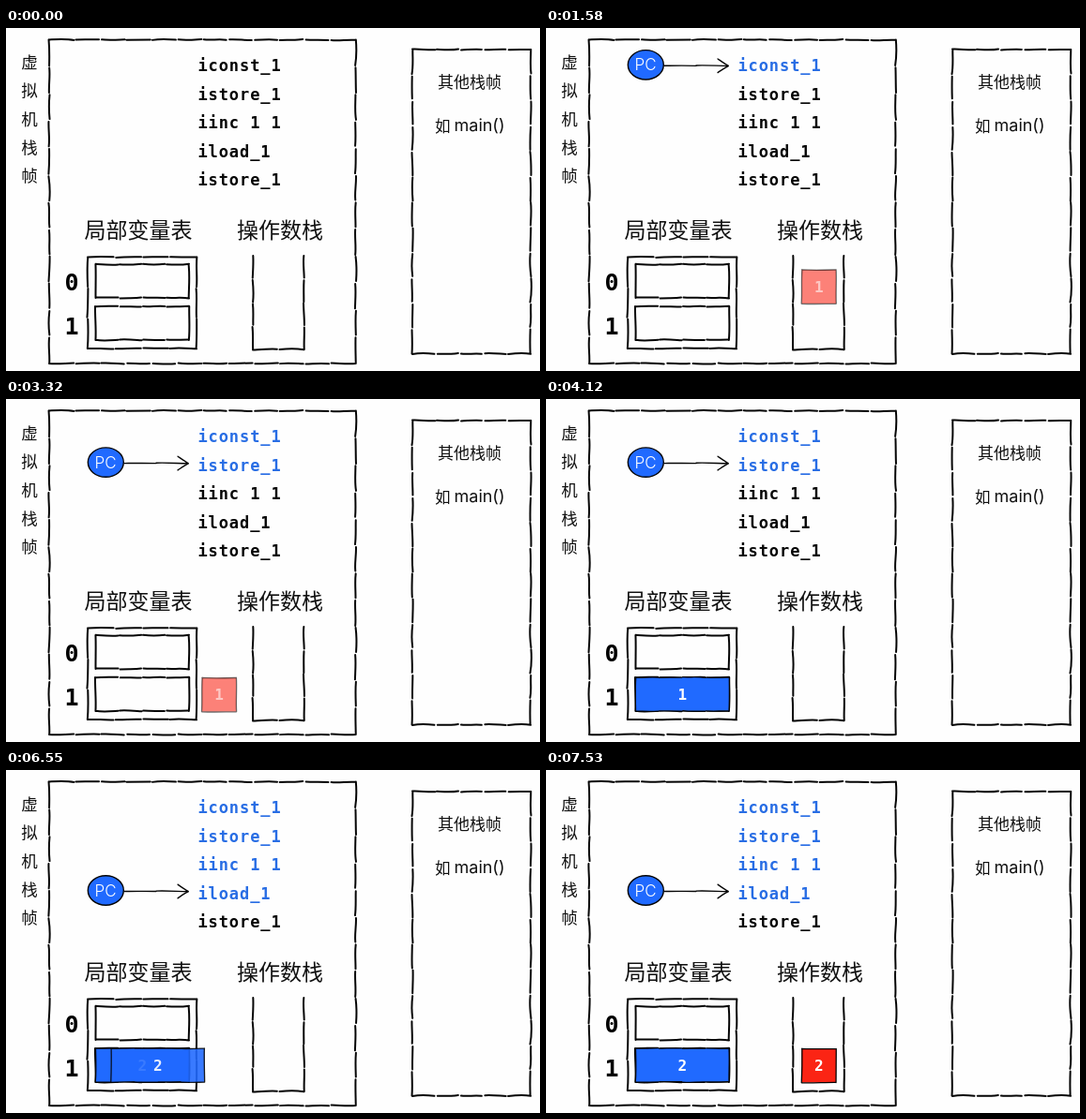
Animation of 569 by 366 pixels, one loop 8 s. Source, as an HTML page:

```html
<!DOCTYPE html>
<html lang="zh">
<head>
<meta charset="utf-8">
<style>
  html, body { margin: 0; width: 100%; height: 100%; overflow: hidden; background: #fefefe; }
  svg { display: block; width: 100vw; height: 100vh; }
  .cjk { font-family: "Noto Sans CJK SC", "Noto Sans CJK", sans-serif; fill: #111; }
  .geo { font-family: Inter, sans-serif; }
  .code { font: bold 17px "DejaVu Sans Mono", monospace; letter-spacing: 0.92px; white-space: pre; }
  .index { font: bold 25px "DejaVu Sans Mono", monospace; }
  .value { font: bold 16px "DejaVu Sans Mono", monospace; fill: #fff; }
</style>
</head>
<body>
<svg id="stage" viewBox="0 0 569 366" preserveAspectRatio="none"></svg>
<script>
const LOOP = 8000;
const BLUE = "#206aff", RED = "#fb2414", DONE = "#286de4", INK = "#050505";
const stage = document.getElementById("stage");

let seed = 11;
function jitter(amount) {
  seed = (seed * 16807) % 2147483647;
  return (seed / 2147483647 * 2 - 1) * amount;
}

function add(parent, tag, attrs, text) {
  const el = document.createElementNS("http://www.w3.org/2000/svg", tag);
  for (const key in attrs) el.setAttribute(key, attrs[key]);
  if (text !== undefined) el.textContent = text;
  parent.appendChild(el);
  return el;
}

function label(parent, cls, x, y, text, attrs) {
  return add(parent, "text", { class: cls, x, y, ...attrs }, text);
}

// Wobbly pen stroke, broken into short pieces
function penLine(x1, y1, x2, y2, gap, wobble) {
  const len = Math.hypot(x2 - x1, y2 - y1);
  const count = Math.max(1, Math.round(len / 28));
  const ux = (x2 - x1) / len, uy = (y2 - y1) / len;
  const at = (d, off) => (x1 + ux * d - uy * off).toFixed(2) + " " + (y1 + uy * d + ux * off).toFixed(2);
  let path = "";
  for (let i = 0; i < count; i++) {
    const from = len * i / count + (i ? gap / 2 + jitter(gap * 0.2) : 0);
    const to = len * (i + 1) / count - (i < count - 1 ? gap / 2 + jitter(gap * 0.2) : 0);
    const third = (to - from) / 3;
    path += `M${at(from, jitter(wobble))}C${at(from + third, jitter(wobble * 2))} ` +
      `${at(to - third, jitter(wobble * 2))} ${at(to, jitter(wobble))}`;
  }
  return path;
}

function pen(parent, points, width, gap = 2.7, wobble = 0.6) {
  let d = "";
  for (let i = 1; i < points.length; i++) d += penLine(...points[i - 1], ...points[i], gap, wobble);
  return add(parent, "path", { d, fill: "none", stroke: INK, "stroke-width": width, "stroke-linecap": "round" });
}

function penRect(parent, x, y, w, h, width, gap, wobble) {
  pen(parent, [[x, y], [x + w, y], [x + w, y + h], [x, y + h], [x, y]], width, gap, wobble);
}

function tile(x, y, w, h, color, text) {
  const g = add(stage, "g", {});
  add(g, "rect", { x, y, width: w, height: h, fill: color });
  penRect(g, x, y, w, h, 1.3, 0.8, 0.4);
  label(g, "value", x + w / 2, y + h / 2 + 5.5, text, { "text-anchor": "middle" });
  return g;
}

// Fixed scene
add(stage, "rect", { width: 569, height: 366, fill: "#fefefe" });
penRect(stage, 46, 12.5, 326.5, 345.5, 2);
penRect(stage, 433, 23, 126, 324.5, 2);
penRect(stage, 87, 244.5, 116, 97.5, 2, 2.2);
penRect(stage, 95.5, 252, 99.5, 36, 2, 2.2);
penRect(stage, 95.5, 297, 99.5, 36, 2, 2.2);
pen(stage, [[263, 243], [263, 343], [317.5, 343], [317.5, 243]], 2, 2.2);

[..."虚拟机栈帧"].forEach((ch, i) =>
  label(stage, "cjk", 25, 42.7 + 30.4 * i, ch, { "font-size": 17.5, "text-anchor": "middle" }));
label(stage, "cjk", 83.5, 224.3, "局部变量表", { "font-size": 23, "font-weight": 300 });
label(stage, "cjk", 246, 224.3, "操作数栈", { "font-size": 23, "font-weight": 300 });
label(stage, "cjk", 460, 63.7, "其他栈帧", { "font-size": 17, "font-weight": 300 });
label(stage, "cjk", 457, 110.5, "如", { "font-size": 16.5, "font-weight": 300 });
label(stage, "geo", 477.5, 110, "main()", { "font-size": 18, fill: "#111" });
label(stage, "index", 70, 279.7, "0", { "text-anchor": "middle" });
label(stage, "index", 70, 327.3, "1", { "text-anchor": "middle" });

const code = ["iconst_1", "istore_1", "iinc 1 1", "iload_1", "istore_1"].map((text, i) =>
  label(stage, "code", 204.4, 46.4 + 30.5 * i, text));

// Program counter with its arrow
const pc = add(stage, "g", {});
add(pc, "ellipse", { cx: 106.3, cy: 0, rx: 19, ry: 15.7, fill: BLUE, stroke: INK, "stroke-width": 1.4 });
label(pc, "geo", 106, 6, "PC", { "font-size": 17, "font-weight": 300, fill: "#fff", "text-anchor": "middle" });
pen(pc, [[126, 0.8], [194, 1]], 1.4, 0, 0.4);
pen(pc, [[183, -6.2], [194, 1], [183, 8.2]], 1.4, 0, 0.4);

// Moving values
const slotOne = tile(95.5, 297, 99.5, 36, BLUE, "1");
const slotTwo = tile(95.5, 297, 99.5, 36, BLUE, "2");
const loaded = tile(95.5, 297, 99.5, 36, BLUE, "2");
const pushed = tile(272.5, 297.5, 36.5, 36, RED, "1");
const result = tile(272.5, 297.5, 36.5, 36, RED, "2");

const progress = (t, start, span) => Math.min(1, Math.max(0, (t - start) / span));

// Parts fade one by one, so a label blends with its own fill
function place(el, opacity, x = 0, y = 0) {
  for (const part of el.children) part.setAttribute("opacity", opacity);
  el.setAttribute("transform", `translate(${x} ${y})`);
  el.setAttribute("visibility", opacity > 0 ? "visible" : "hidden");
}

const STEPS = [1230, 2990, 4710, 6480];
const ROWS = [39.3, 67.6, 99, 128.5];
const DRIFT = 147, ENTRY = 65;

function draw(t) {
  const done = STEPS.filter(s => t >= s).length;
  code.forEach((line, i) => line.setAttribute("fill", i < done ? DONE : INK));
  place(pc, done ? 1 : 0, 0, ROWS[Math.max(0, done - 1)]);

  const enter = progress(t, 1220, 920);
  const leave = progress(t, 2970, 810);
  place(pushed, Math.pow(enter, 0.6) * (1 - leave), -DRIFT * leave, -ENTRY * (1 - enter));

  const update = progress(t, 4700, 770);
  place(slotOne, t >= 3850 && update < 1 ? 1 : 0);
  place(slotTwo, Math.pow(update, 0.6), ENTRY * (1 - update));

  const load = progress(t, 6460, 810);
  place(loaded, load > 0 ? 1 - load : 0, DRIFT * load);
  place(result, progress(t, 7270, 250));
}

function tick(now) {
  draw(now % LOOP);
  requestAnimationFrame(tick);
}
draw(0);
requestAnimationFrame(tick);
</script>
</body>
</html>
```
